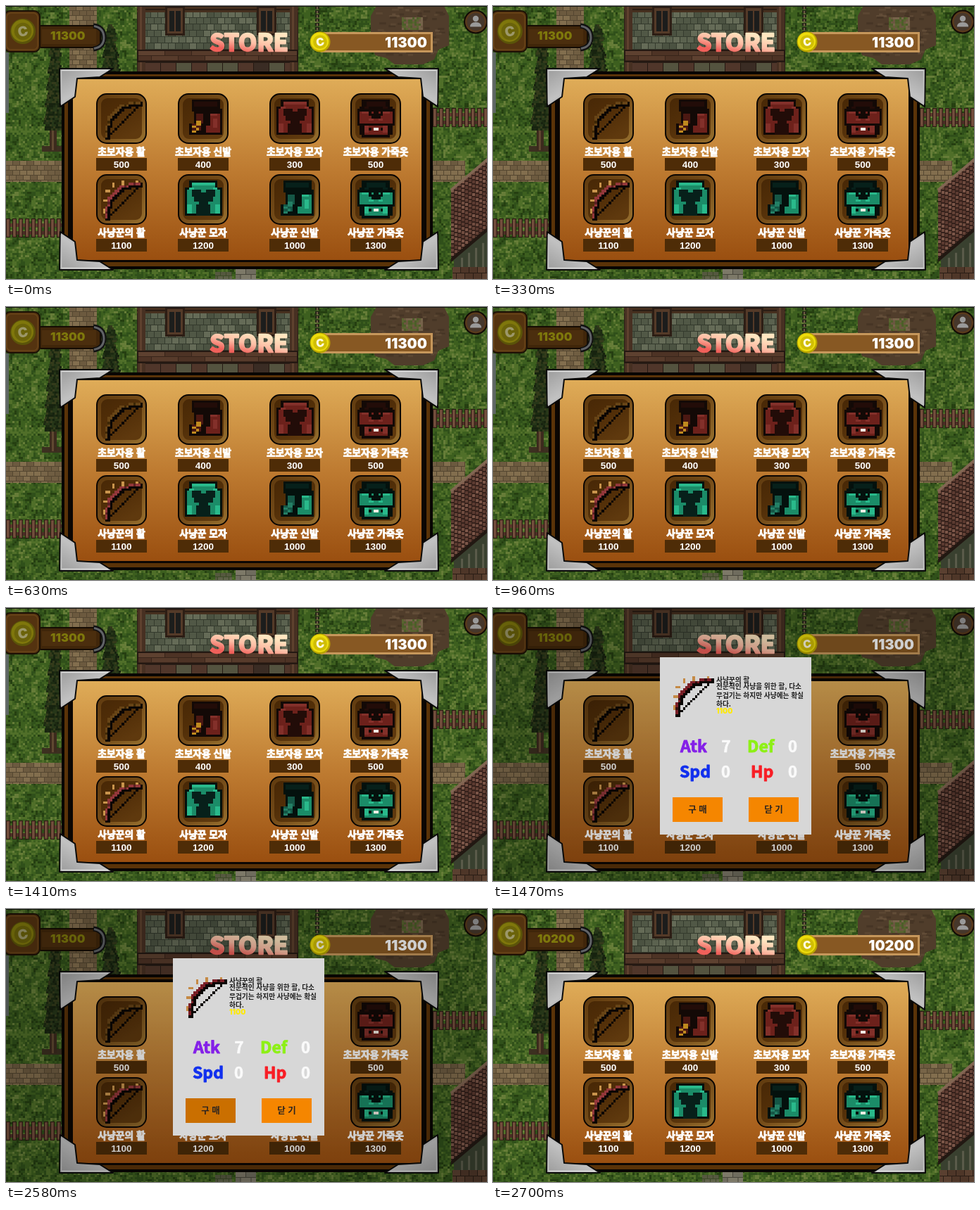
Animation of 683x388 px, one loop 4.05 s. Source, as an HTML page with a canvas:

```html
<!DOCTYPE html>
<html lang="ko">
<head>
<meta charset="utf-8">
<title>Store</title>
<style>
html, body { margin: 0; width: 100%; height: 100%; overflow: hidden; background: #000; }
canvas, svg { position: absolute; left: 0; top: 0; width: 100%; height: 100%; display: block; }
canvas { image-rendering: pixelated; }
.ko { font-family: 'Noto Sans CJK KR', 'Noto Sans CJK', sans-serif; font-weight: 900; stroke-linejoin: round; }
.num { font-family: Inter, sans-serif; font-weight: 900; }
.price { font: bold 13.5px 'Liberation Sans', Arial, sans-serif; fill: #fff; text-anchor: middle; }
</style>
</head>
<body>
<canvas id="world" width="683" height="388"></canvas>
<svg id="stage" viewBox="0 0 683 388" preserveAspectRatio="none"></svg>
<script>
const LOOP = 4050, W = 683, H = 388;

// ---------- World behind the shop ----------
function rng(seed) {
  return () => {
    seed = (seed * 1664525 + 1013904223) >>> 0;
    return seed / 4294967296;
  };
}

function paintWorld(g) {
  const rnd = rng(41);
  const box = (x, y, w, h, col) => { g.fillStyle = col; g.fillRect(x, y, w, h); };
  const pick = a => a[Math.floor(rnd() * a.length)];
  const mosaic = (x, y, w, h, sx, sy, cols) => {
    for (let j = y; j < y + h; j += sy)
      for (let i = x; i < x + w; i += sx)
        box(i, j, Math.min(sx, x + w - i), Math.min(sy, y + h - j), pick(cols));
  };
  const poly = (pts, col) => {
    g.fillStyle = col;
    g.beginPath();
    pts.forEach(([x, y]) => g.lineTo(x, y));
    g.fill();
  };
  // courses of separate blocks with dark joints
  const blocks = (x, y, w, h, sx, sy, cols, joint) => {
    box(x, y, w, h, joint);
    for (let j = y, row = 0; j < y + h; j += sy, row++)
      for (let i = x - (row % 2) * sx / 2; i < x + w; i += sx) {
        const l = Math.max(x, i), r = Math.min(x + w, i + sx - 1);
        box(l, j, r - l, Math.min(sy - 1, y + h - j), pick(cols));
      }
  };

  // grass: small clumps broken up by fine grain
  const greens = ['#253f11', '#30501a', '#3d5f1f', '#506f29', '#667d38'];
  const clumps = Array.from({ length: 80 * 46 }, rnd);
  for (let y = 0; y < H; y += 3)
    for (let x = 0; x < W; x += 3) {
      const n = clumps[Math.floor(y / 9) * 80 + Math.floor(x / 9)] * 0.45 + rnd() * 0.55;
      box(x, y, 3, 3, greens[Math.floor(n * 5)]);
    }

  const stone = ['#786548', '#6c5a3f', '#826e4e', '#705e42'];
  blocks(90, 0, 39, 100, 10, 7, stone, '#544630');
  blocks(0, 220, 82, 30, 10, 7, stone, '#544630');
  blocks(602, 220, 50, 30, 10, 7, stone, '#544630');
  box(0, 66, 4, 86, '#5d6663');
  blocks(326, 374, 29, 14, 15, 8, ['#6f6c5e', '#7d7968'], '#48463b');
  blocks(297, 378, 24, 10, 8, 6, ['#55583f', '#5e6148'], '#3c4a27');

  // house front
  box(186, 0, 229, 95, '#2a1f17');
  blocks(196, 8, 209, 55, 10, 9, ['#5b624f', '#515846', '#656b57', '#4b5241'], '#343a2d');
  box(186, 0, 229, 9, '#46301f');
  box(186, 4, 229, 2, '#2b1d14');
  for (const x of [226, 356]) {
    box(x, 0, 28, 42, '#2d1e15');
    box(x + 3, 3, 22, 36, '#543a28');
    box(x + 6, 7, 16, 29, '#1c1d1c');
    box(x + 13, 7, 2, 29, '#543a28');
  }
  for (const x of [187, 403]) {
    box(x, 0, 11, 94, '#473022');
    box(x + 3, 0, 3, 94, '#5e412e');
  }
  box(186, 62, 229, 18, '#241812');
  blocks(188, 64, 225, 14, 38, 7, ['#573b2b', '#4d3325', '#5e4130'], '#38251a');
  blocks(198, 81, 205, 13, 22, 13, ['#50362a', '#3a2c24', '#54533f'], '#241812');
  for (let y = 0; y < 60; y += 6) {
    box(439, y, 6, 4, '#252618');
    box(441, y + 1, 2, 4, '#6c5b42');
  }

  // bare earth
  poly([[526, 0], [622, 0], [629, 14], [629, 56], [614, 62], [608, 76], [592, 83],
    [552, 83], [540, 74], [524, 70], [518, 52], [518, 14]], '#503d2b');
  for (let i = 0; i < 90; i++)
    box(524 + rnd() * 94, rnd() * 70, 4 + rnd() * 7, 3, pick(['#5a4632', '#463525', '#624d38']));
  mosaic(562, 16, 30, 18, 3, 3, ['#5a6330', '#6b5740', '#4d5e29', '#76634a']);

  // conifers
  const tree = (cx, top, bottom, half) => {
    for (let y = top; y < bottom; y += 3) {
      const k = (y - top) / (bottom - top);
      const w = half * (0.2 + 0.65 * k + 0.25 * ((y - top) % 24) / 24);
      for (let x = cx - w; x < cx + w; x += 3)
        box(Math.round(x), y, 3, 3, pick(['#17230f', '#1d2b12', '#263618', '#343b1b']));
    }
  };
  box(51, 199, 30, 8, '#3c3020');
  box(62, 162, 10, 43, '#3c2a1d');
  box(65, 162, 3, 43, '#604831');
  tree(69, 48, 176, 16);
  tree(148, 26, 112, 15);

  const fence = (x0, x1, y) => {
    box(x0, y + 6, x1 - x0, 5, '#5b3a2c');
    box(x0, y + 17, x1 - x0, 5, '#4d3026');
    for (let x = x0 + 1; x < x1; x += 9) {
      box(x - 1, y - 1, 6, 27, '#2b1b13');
      box(x, y, 4, 25, '#694636');
      box(x + 1, y + 1, 1, 22, '#7d5643');
    }
  };
  fence(0, 80, 303);
  fence(606, W, 146);

  // gable wall and tiled roof
  poly([[683, 318], [636, 358], [636, 388], [683, 388]], '#39402f');
  for (let x = 646; x < W; x += 10) box(x, 362 - (x - 640) * 0.7, 3, 50, '#5a5b4a');
  blocks(634, 371, 49, 17, 12, 9, ['#5a4030', '#4e3628'], '#2a1d15');
  g.save();
  g.beginPath();
  [[683, 218], [632, 261], [632, 362], [683, 319]].forEach(([x, y]) => g.lineTo(x, y));
  g.clip();
  box(630, 215, 60, 160, '#35211b');
  for (let x = 632; x < W; x += 5)
    for (let y = 200 + (683 - x) * 0.84 % 6; y < 372; y += 6)
      box(x, Math.round(y), 4, 4, pick(['#704c3f', '#644236', '#7b5648', '#5b3a30']));
  g.restore();
  poly([[683, 216], [631, 260], [632, 264], [683, 221]], '#826653');
  poly([[683, 315], [632, 358], [632, 364], [683, 321]], '#221812');
}

// ---------- SVG helpers ----------
const rect = (x, y, w, h, fill, more = '') =>
  `<rect x="${x}" y="${y}" width="${w}" height="${h}" fill="${fill}" ${more}/>`;
const text = (x, y, size, fill, str, cls = 'ko', more = '') =>
  `<text x="${x}" y="${y}" font-size="${size}" fill="${fill}" class="${cls}" ${more}>${str}</text>`;
const MID = 'text-anchor="middle"', END = 'text-anchor="end"';
const gradient = (id, stops, dir) =>
  `<linearGradient id="${id}" ${dir}>` + stops.map((s, i) =>
    `<stop offset="${i / (stops.length - 1)}" stop-color="${s}"/>`).join('') + '</linearGradient>';
const cells = (fill, list) => list.split(',').map(s => rect(...s.trim().split(' '), fill)).join('');
const sprite = (x, y, unit, art) =>
  `<g transform="translate(${x} ${y}) scale(${unit})" shape-rendering="crispEdges">${art}</g>`;

// ---------- Item art on a 16-cell grid ----------
const INK = '#0b0604';
const RED = { k: '#130906', d: '#220c08', m: '#6d211b', h: '#83302a', trim: '#c08a1e', back: '#4b1812' };
const TEAL = { k: '#04110d', d: '#07201a', m: '#1b8c68', h: '#29b98b', trim: '#247f65', back: '#155746' };

function bow(limb, dark, peg) {
  let s = '';
  for (let i = 3; i < 16; i++) s += rect(i, 17 - i, 1, 1, INK);
  // quarter curve from the lower tip to the upper one
  const curve = (size, fill) => {
    for (let i = 0; i <= 40; i++) {
      const t = i / 40, x = Math.round(1 + 14 * t * t), y = Math.round(1 + 14 * (1 - t) ** 2);
      s += rect(x, y, size, size, fill[(x + y) % fill.length]);
    }
  };
  curve(2, [INK]);
  curve(1, [limb, limb, dark]);
  return peg ? s + cells(peg, '1 4 2 1,4 1 1 2,8 0 1 2,14 0 1 1,0 8 2 1,0 12 1 2') : s;
}

const vest = c => cells(c.k, '2 0 12 16,0 4 16 7,1 3 14 12') + cells(c.d, '4 1 8 2,3 3 2 1,11 3 2 1') +
  cells(c.m, '1 5 6 5,9 5 6 5,3 11 10 4,7 8 2 2') +
  cells(c.h, '2 5 3 1,11 5 3 1,5 8 2 1,9 8 2 1,3 11 2 3,11 11 2 3') +
  cells(c.k, '5 5 1 2,10 5 1 2,6 6 1 2,9 6 1 2,7 10 2 1,5 12 1 1,10 12 1 1') +
  cells('#f4eee4', '7 12 2 1');

const hat = c => cells(c.k, '2 0 12 15,0 3 16 12') +
  cells(c.m, '3 1 10 13,1 4 14 10') + cells(c.h, '3 1 10 1,2 3 2 1,12 3 2 1,1 10 2 4,13 10 2 4') +
  cells(c.d, '3 4 4 3,9 4 4 3,4 5 8 4,6 9 4 2,5 10 6 5');

const boots = c => cells(c.k, '3 0 12 5,4 4 12 2,9 5 7 10,4 6 6 5,2 10 8 5') +
  cells(c.d, '4 1 10 2') + cells(c.m, '11 6 4 8,9 11 4 3') +
  cells(c.back, '5 6 3 4,3 10 4 3') + cells(c.h, '11 6 3 1,12 8 2 4') +
  cells(c.trim, '5 9 2 2,3 11 2 1,5 12 1 1,3 13 2 1');

const plainBow = bow('#674416', '#3d2706');
const huntBow = bow('#92373a', '#5a2022', '#c9944c');

const COLS = [128, 244, 374, 489];
const ITEMS = [
  ['초보자용 활', 500, plainBow], ['초보자용 신발', 400, boots(RED)],
  ['초보자용 모자', 300, hat(RED)], ['초보자용 가죽옷', 500, vest(RED)],
  ['사냥꾼의 활', 1100, huntBow], ['사냥꾼 모자', 1200, hat(TEAL)],
  ['사냥꾼 신발', 1000, boots(TEAL)], ['사냥꾼 가죽옷', 1300, vest(TEAL)]
];

function shopItem([name, price, art], i) {
  const x = COLS[i % 4], y = i < 4 ? 124 : 239;
  return rect(x + 1, y + 1, 70, 70, 'url(#tile)', 'rx="14" stroke="#0a0502" stroke-width="2"') +
    rect(x + 7, y + 7, 58, 58, 'url(#well)', 'rx="9"') +
    sprite(x + 9.5, y + 9, 3.35, art) +
    text(x + 36, y + 88, 13.8, '#fff', name, 'ko', MID + ' stroke="#fff" stroke-width=".9"') +
    rect(x, y + 92, 72, 18, '#4e2c07') +
    `<text x="${x + 36}" y="${y + 106}" class="price">${price}</text>`;
}

// ---------- Frame, header, dialog ----------
const bracket = `<path d="M76 89H152L133 101L101 103L98 129L77 143Z"
  fill="url(#steel)" stroke="#0a0a0a" stroke-width="2" stroke-linejoin="round"/>
  <path d="M79 91.5H145" stroke="#dcdcdc" stroke-width="1.5"/>
  <path d="M78.5 91V139" stroke="#c4c4c4" stroke-width="1.5"/>`;

const coin = (x, y, r, a, b, ink) =>
  `<circle cx="${x}" cy="${y}" r="${r}" fill="${b}"/>
   <circle cx="${x - r * 0.04}" cy="${y - r * 0.05}" r="${r * 0.88}" fill="${a}"/>
   <circle cx="${x}" cy="${y}" r="${r * 0.68}" fill="${b}" opacity=".55"/>` +
  text(x, y + r * 0.39, r * 1.08, ink, 'C', 'num', MID + ` transform="rotate(-12 ${x} ${y})"`);

const stat = (x, y, col, name, vx, val) =>
  text(x, y, 23, col, name, 'ko', `stroke="${col}" stroke-width=".9"`) +
  text(vx, y, 22, '#fafafa', val, 'ko', MID + ' stroke="#fafafa" stroke-width=".7"');

const button = (x, id, label) => rect(x, 269, 71, 35, '#f58600', `id="${id}"`) +
  text(x + 35.5, 291, 12.5, '#2b2420', label, 'ko', MID);

const note = (y, str) => text(317, y, 9.7, '#1d1d1d', str);

const stage = document.getElementById('stage');
stage.innerHTML = `<defs>
  ${gradient('wood', ['#dfac58', '#be7b31', '#9a4f10'], 'x1="0" y1="0" x2="0" y2="1"')}
  ${gradient('tile', ['#5f3a0e', '#754c19', '#98712f'], 'x1="0" y1="0" x2="1" y2="1"')}
  ${gradient('well', ['#482806', '#512e08', '#5f390e'], 'x1="0" y1="0" x2=".6" y2="1"')}
  ${gradient('steel', ['#9a9a9a', '#c2c2c2', '#747474'], 'x1="0" y1="0" x2=".9" y2="1"')}
  ${gradient('title', ['#ffe6c0', '#fdbfa6', '#f0605a'], 'gradientUnits="userSpaceOnUse" x1="348" y1="37" x2="342" y2="67"')}
  </defs>
  ${rect(0, 0, W, 1, '#101010')}

  ${rect(46, 28, 88, 31, '#40260a', 'rx="4" stroke="#150c04" stroke-width="2"')}
  ${rect(51, 33, 77, 21, '#4b2e0e')}
  <path d="M124 28Q139 30 139 45Q139 59 124 61" fill="none" stroke="#111" stroke-width="7"/>
  <path d="M125 28.5Q139 31 139 45Q139 58 125 60.5" fill="none" stroke="#606266" stroke-width="3"/>
  ${rect(-2, 7, 50, 58, '#543310', 'rx="8" stroke="#1c1005" stroke-width="2"')}
  ${rect(1, 10, 44, 52, 'none', 'rx="6" stroke="#694419" stroke-width="1.5"')}
  ${coin(24, 36, 18, '#7f770c', '#5b5409', '#9c9769')}
  ${text(63, 48, 16.5, '#7e780c', '', 'num', 'id="purse"')}

  <circle cx="667" cy="22.5" r="16" fill="#5a3a1c" stroke="#110a05" stroke-width="2"/>
  <circle cx="667" cy="22.5" r="12.5" fill="#46372b"/>
  <circle cx="667" cy="18" r="4.2" fill="#9a9a9a"/>
  <path d="M659 29.5Q659 23 667 23T675 29.5Z" fill="#9a9a9a"/>

  ${text(345, 64, 34, 'url(#title)', 'STORE', 'ko',
    MID + ' letter-spacing=".1" stroke="url(#title)" stroke-width="2.4"')}
  ${rect(448, 38.5, 156.5, 26, '#875823', 'stroke="#c6975b" stroke-width="3"')}
  ${coin(446, 51, 14.5, '#ecdc0c', '#b9a500', '#fffbe0')}
  ${text(598, 58.5, 20, '#fff', '', 'num', END + ' id="gold"')}

  ${rect(79, 93, 527, 281, '#080503', 'rx="2"')}
  ${rect(83, 97, 519, 273, '#5a3308')}
  ${rect(88, 100, 509, 264, '#0b0603')}
  ${rect(95, 104, 495, 257, 'url(#wood)')}
  ${['', 'translate(690 0) scale(-1 1)', 'translate(0 464) scale(1 -1)', 'translate(690 464) scale(-1 -1)']
    .map(m => `<g transform="${m}">${bracket}</g>`).join('')}
  ${ITEMS.map(shopItem).join('')}

  <g id="dialog">
    ${rect(0, 0, W, H, '#000', 'opacity=".19"')}
    ${rect(237, 70, 215, 252, '#d7d7d7')}
    ${sprite(256, 97, 3.4, bow('#7a1f27', '#35100f', '#c58a45'))}
    ${note(105.5, '사냥꾼의 활')}
    ${note(114.5, '전문적인 사냥을 위한 활, 다소')}
    ${note(127.5, '무겁기는 하지만 사냥에는 확실')}
    ${note(140, '하다.')}
    ${text(317, 149.5, 10, '#ffea00', '1100', 'num')}
    ${stat(266, 204.5, '#8420e8', 'Atk', 331, 7)}
    ${stat(361, 204.5, '#8df015', 'Def', 425.5, 0)}
    ${stat(265, 241, '#1230ee', 'Spd', 330.5, 0)}
    ${stat(366, 241, '#f81d25', 'Hp', 425.5, 0)}
    ${button(255, 'buy', '구 매')}
    ${button(363, 'close', '닫 기')}
  </g>`;

// ---------- Animation ----------
const el = id => document.getElementById(id);
const purse = el('purse'), gold = el('gold'), dialog = el('dialog'), buy = el('buy');
const OPEN = 1470, SHUT = 2640;
// buy button brightness: hover, then press
const SHADES = [[0, 1], [1860, 0.99], [1890, 0.975], [1920, 0.965], [2550, 0.9], [2580, 0.825]];

function draw(t) {
  const sum = t < SHUT ? '11300' : '10200';
  purse.textContent = sum;
  gold.textContent = sum;
  dialog.setAttribute('visibility', t >= OPEN && t < SHUT ? 'visible' : 'hidden');
  const shade = SHADES.filter(s => t >= s[0]).pop()[1];
  buy.setAttribute('fill', `rgb(${Math.round(245 * shade)},${Math.round(134 * shade)},0)`);
}

paintWorld(el('world').getContext('2d'));
const start = performance.now();
function tick() {
  draw((performance.now() - start) % LOOP);
  requestAnimationFrame(tick);
}
draw(0);
requestAnimationFrame(tick);
</script>
</body>
</html>
```
